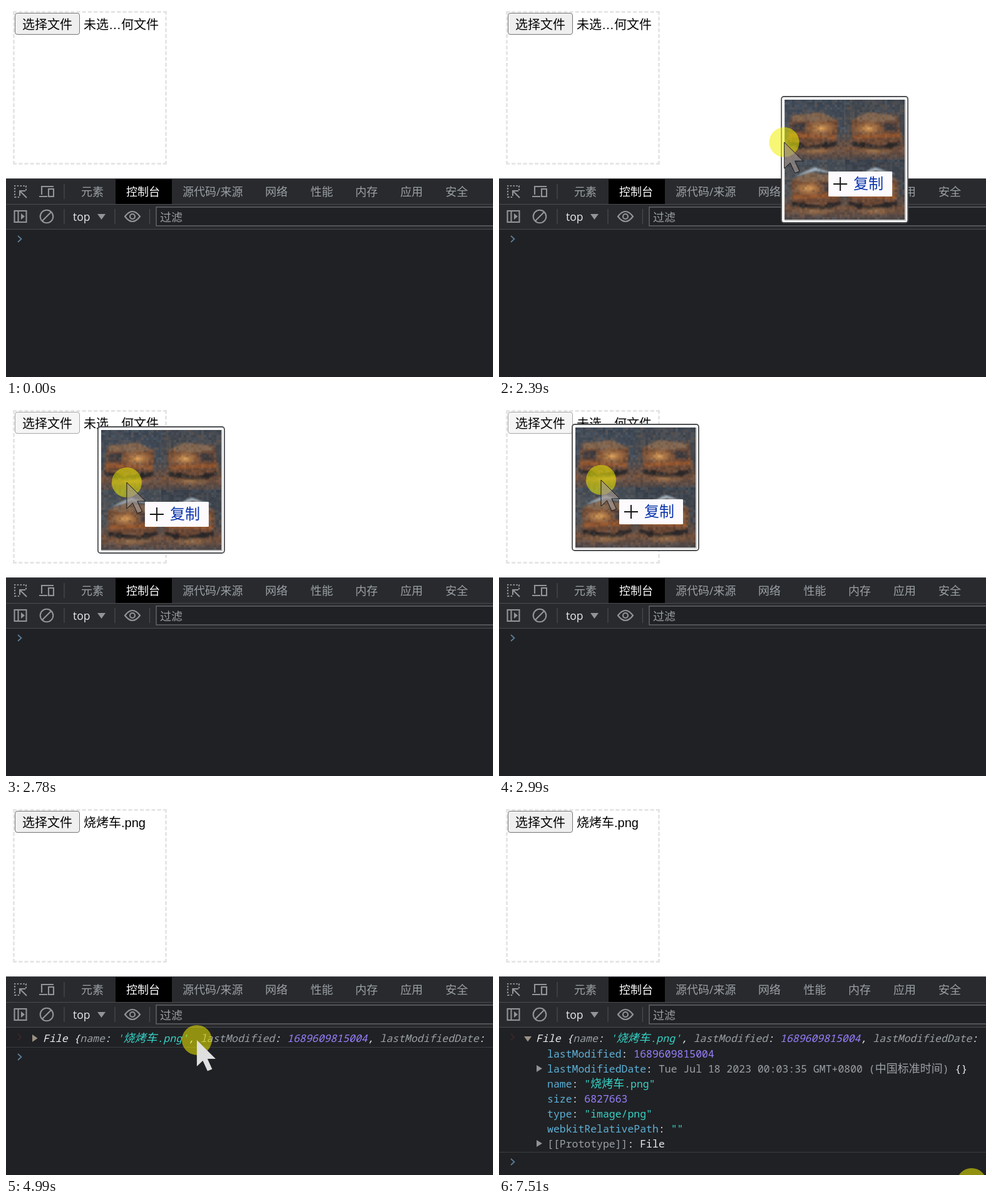
Animation of 778x594 px, one loop 7580 ms. Source, as an HTML page:

```html
<!DOCTYPE html>
<html lang="zh-CN">
<head>
<meta charset="utf-8">
<title>拖放文件</title>
<style>
  html, body { margin: 0; width: 100%; height: 100%; overflow: hidden; background: #fff; }
  svg { display: block; width: 100vw; height: 100vh; }
  text { white-space: pre; }
  .page { font: 20px "Liberation Sans", "Noto Sans CJK SC", sans-serif; }
  .ui { font: 18px "Open Sans", "Noto Sans CJK SC", sans-serif; fill: #9aa0a6; }
  .mono { font: 16.48px "Noto Sans Mono", "Noto Sans CJK SC", monospace; fill: #e8eaed; }
  .mono .cjk { font-family: "Noto Sans CJK SC", sans-serif; font-size: 18px; }
  .icon { fill: none; stroke: #919499; stroke-width: 2.1; }
</style>
</head>
<body>
<svg id="stage" viewBox="0 0 778 594">
  <defs>
    <linearGradient id="dusk" x2="0" y2="1">
      <stop offset="0" stop-color="#3a4350" stop-opacity=".5"/>
      <stop offset=".5" stop-color="#4d4a4b" stop-opacity=".3"/>
      <stop offset=".8" stop-color="#7a5138" stop-opacity=".85"/>
      <stop offset="1" stop-color="#4f4a4c"/>
    </linearGradient>
    <radialGradient id="lamp">
      <stop offset="0" stop-color="#e8a85c"/>
      <stop offset="1" stop-color="#a8683a" stop-opacity="0"/>
    </radialGradient>
    <filter id="soft"><feGaussianBlur stdDeviation="1.6"/></filter>
    <g id="truck">
      <rect width="96" height="96" fill="url(#dusk)"/>
      <g filter="url(#soft)">
        <path d="M10 34L38 20L86 26L90 66L58 76L12 68Z" fill="#6d4a36"/>
        <path d="M12 32L38 20L84 26L82 34L40 36Z" fill="#83664f"/>
        <path d="M62 37L83 38L85 50H62Z" fill="#3f3b3c"/>
        <path d="M12 66L58 74L90 66V72L58 81L12 74Z" fill="#2f2a2c"/>
        <circle cx="30" cy="73" r="6" fill="#292528"/>
        <circle cx="72" cy="74" r="6" fill="#292528"/>
        <path d="M14 57L88 54L89 60L14 63Z" fill="#99592f"/>
      </g>
      <ellipse cx="38" cy="46" rx="30" ry="15" fill="url(#lamp)"/>
      <ellipse cx="48" cy="82" rx="40" ry="9" fill="url(#lamp)" opacity=".45"/>
    </g>
    <clipPath id="photoClip"><rect width="192" height="192"/></clipPath>
  </defs>

  <rect width="778" height="594" fill="#fff"/>
  <path d="M11 9.5H257M11 252.5H257M12.5 8V254M255.5 8V254" stroke="#e6e6e6" stroke-width="3" stroke-dasharray="6 3.23"/>
  <rect id="button" x="14.5" y="11.5" width="103" height="34" rx="3.5"/>
  <text class="page" x="26" y="37">选择文件</text>
  <text class="page" id="fileName" x="124" y="37"></text>

  <rect y="276" width="778" height="318" fill="#202124"/>
  <rect y="276" width="778" height="81" fill="#292a2d"/>
  <rect x="175" y="277" width="90" height="40" fill="#000"/>
  <path d="M0 276.500H778M0 317.500H778M0 357.500H778M93 285V309M93 325V349M174 325V349M229.500 325V349" stroke="#4a4c50" stroke-width="1.2"/>
  <rect x="240" y="322" width="560" height="30" fill="#202124" stroke="#5f6368" stroke-width="1.5"/>
  <g id="tabs" class="ui"></g>
  <text class="ui" x="107" y="344" style="fill:#e8eaed;font-size:17.5px">top</text>
  <text class="ui" x="246" y="345">过滤</text>
  <g class="icon">
    <path d="M13 288H33M14 291V307M14 306H22M32 288V296" stroke-dasharray="2.4 2.4"/>
    <path d="M33 307L23 297M22 304V296H31"/>
    <path d="M57 302V289H76M53 305H66"/><rect x="68" y="293" width="8" height="12"/>
    <rect x="13.5" y="328" width="19" height="18"/><path d="M19.5 328V346"/>
    <circle cx="65" cy="337" r="10.3"/><path d="M58 344L72 330"/>
    <path d="M190 337Q202 321 214 337Q202 353 190 337Z"/><circle cx="202" cy="337" r="4"/>
  </g>
  <path d="M24 332L30 337L24 342ZM146 333H159L152.500 342Z" fill="#919499"/>

  <g id="row">
    <path d="M19 368L24 373L19 378" fill="none" stroke="#38272b" stroke-width="2"/>
    <path id="caret" fill="#9a9184"/>
  </g>
  <g id="details"><path d="M60 418L69 423.500L60 429ZM60 538L69 543.500L60 549Z" fill="#8f9297"/></g>
  <g id="prompt">
    <path id="rule" d="M0 -15.500H778" stroke="#3c3d41"/>
    <path d="M19 -5L24.500 0L19 5" fill="none" stroke="#5c7f9a" stroke-width="1.7"/>
  </g>

  <g id="drag">
    <rect x="1" y="1" width="202" height="202" rx="4" fill="#fff"/>
    <path d="M199 6V199H6" fill="none" stroke="#c4c4c4" stroke-width="2"/>
    <rect x="1" y="1" width="202" height="202" rx="4" fill="none" stroke="#4c4e50" stroke-width="1.8"/>
    <g id="photo" transform="translate(6 6)" clip-path="url(#photoClip)"></g>
  </g>
  <circle id="press" r="24" fill="#f0ee00" opacity=".54"/>
  <path id="pointer"/>
  <g id="label">
    <rect id="labelBox" x="76" y="121" width="102" height="40" rx="1" fill="#fcfafc"/>
    <path id="plusEdge" d="M83 141H107M95 129V153" stroke="#d8d8d8" stroke-width="4.4"/>
    <path d="M84 141H106M95 130V152" stroke="#151515" stroke-width="2"/>
    <text id="copy" x="116" y="149" fill="#0b35ad" style="font:24px 'Noto Sans CJK SC',sans-serif">复制</text>
  </g>
</svg>
<script>
const LOOP = 7580;
const $ = id => document.getElementById(id);

function add(parent, tag, attrs = {}, text = '') {
  const node = document.createElementNS('http://www.w3.org/2000/svg', tag);
  for (const k in attrs) node.setAttribute(k, attrs[k]);
  node.textContent = text;
  return parent.appendChild(node);
}

// Tool tabs
[[120, '元素'], [192, '控制台'], [282, '源代码/来源'], [414, '网络'],
 [486.5, '性能'], [558, '内存'], [630, '应用'], [702, '安全']].forEach(([x, name], i) =>
  add($('tabs'), 'text', { x, y: 304, style: i === 1 ? 'fill:#fff' : '' }, name));

// Console text: pairs of colour and string, Chinese runs set larger
const WHITE = '#e8eaed', GRAY = '#9aa0a6', BLUE = '#5db0d7', TEAL = '#35d4c7', VIOLET = '#9980ff';
const FILE = '烧烤车.png', STAMP = '1689609815004';

function line(parent, x, y, parts, style = '') {
  const text = add(parent, 'text', { x, y, class: 'mono', style });
  for (const [fill, str] of parts)
    for (const run of str.match(/[\u4e00-\u9fff]+|[^\u4e00-\u9fff]+/g))
      add(text, 'tspan', { style: `fill:${fill}`, class: run > '\u4e00' ? 'cjk' : '' }, run);
}

line($('row'), 59, 381, [
  [WHITE, 'File {'], [GRAY, 'name'], [WHITE, ': '], [TEAL, `'${FILE}'`], [WHITE, ', '],
  [GRAY, 'lastModified'], [WHITE, ': '], [VIOLET, STAMP], [WHITE, ', '],
  [GRAY, 'lastModifiedDate'], [WHITE, ':']
], 'font-style:italic');

[['lastModified', [VIOLET, STAMP]],
 ['lastModifiedDate', [GRAY, 'Tue Jul 18 2023 00:03:35 GMT+0800 (中国标准时间)'], [WHITE, ' {}']],
 ['name', [TEAL, `"${FILE}"`]],
 ['size', [VIOLET, '6827663']],
 ['type', [TEAL, '"image/png"']],
 ['webkitRelativePath', [TEAL, '""']],
 ['[[Prototype]]', [WHITE, 'File']]].forEach(([key, ...value], i) =>
  line($('details'), 77, 406 + 24 * i, [[key[0] === '[' ? GRAY : BLUE, key], [WHITE, ': '], ...value]));

// Dragged picture: four dusky tiles, each with a lit truck, plus fine grain
let seed = 7;
const rnd = () => (seed = seed * 16807 % 2147483647) / 2147483647;

['#43505f', '#484c52', '#50585f', '#3c434c'].forEach((fill, i) => {
  const x = i % 2 * 96, y = (i >> 1) * 96;
  add($('photo'), 'rect', { x, y, width: 96, height: 96, fill });
  add($('photo'), 'use', {
    href: '#truck', transform: i % 3 ? `translate(${x} ${y})` : `translate(${x + 96} ${y}) scale(-1 1)`
  });
  if (i > 1) add($('photo'), 'path', {
    d: `M${x + 14} ${y + 28}L${x + 48} ${y + 12}L${x + 84} ${y + 24}L${x + 50} ${y + 18}Z`,
    fill: '#a3b2bd', filter: 'url(#soft)'
  });
});
for (let i = 0; i < 2304; i++) add($('photo'), 'rect', {
  x: i % 48 * 4, y: Math.floor(i / 48) * 4, width: 4, height: 4,
  fill: ['#1c222a', '#2c2d33', '#b87a4a', '#74848f'][rnd() * 4 | 0], opacity: (rnd() * .2).toFixed(2)
});

// Spells of motion: first picture, last picture, number of pictures
const RUNS = [[2250, 2990, 12], [3740, 4440, 11], [4510, 5200, 11], [5270, 6020, 12],
  [6090, 6090, 1], [6420, 6420, 1], [6570, 6850, 5], [7510, 7510, 1]];

const POINTER = [
  [2250, 635, 302], [2519, 304, 150], [2788, 193, 124], [2990, 163, 120],
  [3740, 175, 126], [3880, 245, 150], [4020, 319, 190], [4300, 390, 290], [4440, 405, 355],
  [4510, 392, 364], [4786, 325, 382], [4924, 307, 379], [5200, 307, 379],
  [5270, 317, 400], [5475, 372, 510], [5680, 383, 572], [5815.5, 366, 561], [5883.6, 366, 561],
  [6020, 366, 563], [6090, 366, 564], [6420, 366, 565], [6570, 375, 568], [6850, 705, 622], [7510, 755, 607]];

const PICTURE = [[2250, 671.5, 244], [2519, 265, 63], [2788, 146, 34], [2990, 116, 30]];

function snap(t) {
  const run = RUNS.filter(r => r[0] <= t).pop();
  if (!run) return t;
  const [start, end, count] = run;
  const step = (end - start) / (count - 1) || 1;
  return start + step * Math.min(count - 1, Math.floor((t - start + 10) / step));
}

// Smooth curve through timed points
function at(keys, t) {
  const last = keys.length - 1;
  if (t <= keys[0][0]) return keys[0].slice(1);
  if (t >= keys[last][0]) return keys[last].slice(1);
  const i = keys.findIndex(k => k[0] > t) - 1;
  const [a, b] = [keys[i], keys[i + 1]];
  const p = keys[Math.max(0, i - 1)], n = keys[Math.min(last, i + 2)];
  const d = b[0] - a[0], u = (t - a[0]) / d, v = 1 - u;
  return [1, 2].map(c => {
    const ma = (b[c] - p[c]) / (b[0] - p[0]) * d, mb = (n[c] - a[c]) / (n[0] - a[0]) * d;
    return (1 + 2 * u) * v * v * a[c] + u * v * v * ma + u * u * (3 - 2 * u) * b[c] - u * u * v * mb;
  });
}

const ARROW = 'M0 0V42L9.500 33L17 49.500L24.500 46.500L17 30H30Z';
const BEAM = 'M-9.500 -20.500H9.500V-17H2.500V17H9.500V20.500H-9.500V17H-2.500V-17H-9.500Z';

const within = (t, from, to) => t >= from && t < to;
const show = (id, on) => $(id).setAttribute('display', on ? 'inline' : 'none');
const move = (id, [x, y]) => $(id).setAttribute('transform', `translate(${x.toFixed(1)} ${y.toFixed(1)})`);
const paint = (id, fill, stroke) => {
  $(id).setAttribute('fill', fill);
  $(id).setAttribute('stroke', stroke);
};

function draw(t) {
  const s = snap(t), pos = at(POINTER, s), box = at(PICTURE, s);
  const dragging = within(t, 2250, 3400), entering = t < 2315;
  const pressed = dragging || within(t, 4920, 5130) || t >= 7505;
  const logged = t >= 3470, open = t >= 5130;
  const hover = within(t, 2640, 3400);

  paint('button', hover ? '#f5f5f5' : '#efefef', hover ? '#a8a8a8' : '#767676');
  $('fileName').textContent = t < 3400 ? '未选…何文件' : FILE;

  show('row', logged);
  show('details', open);
  show('rule', logged);
  $('caret').setAttribute('d', open ? 'M40 372H52L46 380.500Z' : 'M42 369L50.500 375L42 381Z');
  move('prompt', [0, open ? 573 : logged ? 405 : 373]);

  show('drag', dragging);
  show('label', dragging);
  move('drag', box);
  move('label', box);
  show('labelBox', !entering);
  show('copy', !entering);
  show('plusEdge', entering);

  show('press', pressed);
  move('press', pos);

  // The free pointer inverts what lies below it
  const beam = within(t, 4360, 4640) || within(t, 5265, 6900);
  show('pointer', t >= 2250);
  move('pointer', pos);
  $('pointer').setAttribute('d', beam ? BEAM : ARROW);
  $('pointer').style.mixBlendMode = pressed ? 'normal' : 'difference';
  if (!pressed) paint('pointer', '#fff', 'none');
  else if (dragging && !entering) paint('pointer', 'rgba(165,152,146,.62)', '#17171a');
  else paint('pointer', '#dfdfdf', 'none');
}

function tick() {
  draw(performance.now() % LOOP);
  requestAnimationFrame(tick);
}
tick();
</script>
</body>
</html>
```
